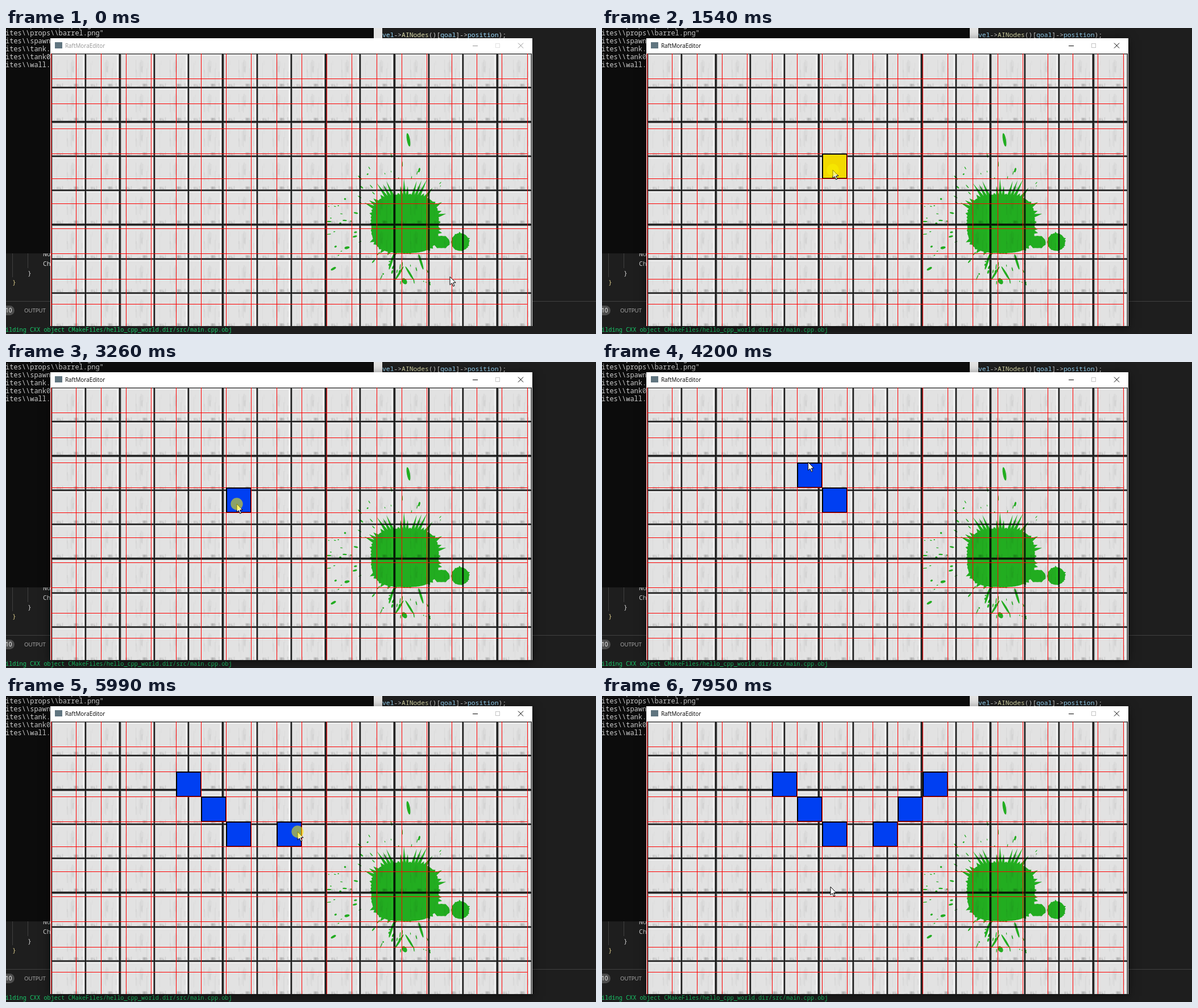
Write an HTML page with a canvas that moves like this. It is 1038 px wide and 539 px high and loops after 8000 ms.

```html
<!DOCTYPE html>
<html lang="en">
<head>
<meta charset="utf-8">
<title>Tile editor</title>
<style>
  html, body { margin: 0; width: 1038px; height: 539px; overflow: hidden; background: #1e1e1e; }
  canvas { display: block; }
</style>
</head>
<body>
<canvas id="stage" width="1038" height="539"></canvas>
<script>
const W = 1038, H = 539, LOOP = 8000, TILE = 60.35, CELL = 44.1;
const PRESS = 200, PAINT_DELAY = 40;
const BLUE = '#003ff2', YELLOW = '#f2d900';
const MONO = '"Noto Sans Mono", monospace', SANS = '"Open Sans", sans-serif';
const ctx = document.getElementById('stage').getContext('2d');

const gridX = col => Math.floor(79.15 + col * CELL);
const gridY = row => Math.floor(45.1 + row * CELL);

// Where the cursor rests; a painting stop ends with a click on the cell below it.
const stop = (arrive, leave, x, y, paints = false) => ({ arrive, leave, x, y, paints });
const stops = [
  stop(0, 30, 781, 438),
  stop(80, 3320, 406, 250, true),
  stop(3900, 4130, 368, 179, true),
  stop(4900, 5160, 310, 151, true),
  stop(5450, 5450, 543, 232),
  stop(5580, 6140, 513, 239, true),
  stop(6400, 6650, 545, 196, true),
  stop(6780, 6780, 571, 153),
  stop(6880, 7160, 577, 160, true),
  stop(7520, 7520, 377, 404),
  stop(7700, 7850, 414, 345),
  stop(7950, LOOP, 402, 336)
];
const strokes = stops.filter(s => s.paints);
// Trial clicks on the first cell, the third paints and the fourth clears
const trials = [[290, 720], [880, 1180], [1540, 1640], [1970, 2100], [2790, 2890]];
const presses = [...trials, ...strokes.map(s => [s.leave - PRESS, s.leave])];

function layer(w, h, draw) {
  const c = document.createElement('canvas');
  c.width = w;
  c.height = h;
  draw(c.getContext('2d'));
  return c;
}

function rect(g, color, x, y, w, h) {
  g.fillStyle = color;
  g.fillRect(x, y, w, h);
}

function text(g, str, x, y, size, family, color) {
  g.font = `${size}px ${family}`;
  g.fillStyle = color;
  g.fillText(str, x, y);
  return x + g.measureText(str).width;
}

function seeded(seed) {
  return () => (seed = seed * 16807 % 2147483647) / 2147483647;
}

const desktop = layer(W, H, g => {
  rect(g, '#1e1e1e', 0, 0, W, H);
  rect(g, '#414141', 0, 481, W, 1);
  rect(g, '#404040', 11, 397, 1, 42);
  rect(g, '#404040', 38, 397, 1, 26);
  ['No', 'Ch', '}', '}'].forEach((s, i) =>
    text(g, s, [65, 65, 38, 11][i], 402 + i * 16.8, 11.4, MONO, i < 3 ? '#d4d4d4' : '#d9c98a'));
  g.fillStyle = '#4d4d4d';
  g.beginPath();
  g.roundRect(-10, 489, 25, 17, 8.5);
  g.fill();
  text(g, '10', -1, 501, 10, SANS, '#fff');
  text(g, 'OUTPUT', 32, 501, 9.6, SANS, '#b5b5b5');
  text(g, 'ilding CXX object CMakeFiles/hello_cpp_world.dir/src/main.cpp.obj', -1, 535, 10.23, MONO, '#18cc6a');

  rect(g, '#0c0c0c', 0, 0, 647, 397);
  ['props\\\\prop', 'props\\\\barrel', 'spawn', 'tank', 'tank0', 'wall'].forEach((name, i) =>
    text(g, `ites\\\\${name}.png"`, -1, -1 + i * 14, 12, MONO, '#ccc'));
  rect(g, '#e4e4e4', 647, 0, 15, 19);
  let x = 662;
  for (const word of 'vel -> AINodes ()[ goal ]-> position );'.split(' ')) {
    const color = word === 'AINodes' ? '#dcdcaa' : /\w/.test(word) ? '#9cdcfe' : '#d4d4d4';
    x = text(g, word, x, 16, 11.37, MONO, color);
  }
});

const tile = layer(61, 61, g => {
  const rnd = seeded(77);
  rect(g, '#e2e2e2', 0, 0, 61, 61);
  for (let i = 0; i < 16; i++)
    rect(g, `rgba(120,120,120,${0.02 + rnd() * 0.07})`, 5 + rnd() * 48, 8 + rnd() * 24, 1 + rnd() * 2, 8 + rnd() * 22);
  for (let i = 0; i < 16; i++) {
    const h = 1 + rnd() * 5;
    rect(g, `rgba(100,100,100,${0.06 + rnd() * 0.16})`, 3 + rnd() * 52, 58 - h, 1 + rnd() * 4, h);
  }
  rect(g, '#eee', 2, 2, 55, 2);
  rect(g, '#f1f1f1', 55, 2, 3, 55);
  // Grooves, shared with the next tile
  for (const [at, color] of [[1, '#a8a8a8'], [58, '#909090'], [0, '#2c2c2c'], [60, '#2c2c2c'], [59, '#0e0e0e']]) {
    rect(g, color, at, 0, 1, 61);
    rect(g, color, 0, at, 61, 1);
  }
});

function drawSplat(g) {
  const rnd = seeded(29), cx = 702, cy = 345;
  const shape = new Path2D();
  // Rounded box with a ragged rim; reach(angle) sets how far the spikes go
  const blot = (x, y, rx, ry, power, count, reach) => {
    for (let i = 0; i < count; i++) {
      const a = i / count * 2 * Math.PI, c = Math.cos(a), s = Math.sin(a);
      const rim = (Math.abs(c / rx) ** power + Math.abs(s / ry) ** power) ** (-1 / power);
      const r = rim * 0.97 + (i % 2 ? reach(a) * rnd() ** 2 : 0);
      shape[i ? 'lineTo' : 'moveTo'](x + r * c, y + r * s);
    }
    shape.closePath();
  };
  const drop = (x, y, rx, ry, turn) => {
    shape.moveTo(x + rx * Math.cos(turn), y + rx * Math.sin(turn));
    shape.ellipse(x, y, rx, ry, turn, 0, 7);
  };
  const scatter = (count, from, to, near, far) => {
    for (let i = 0; i < count; i++) {
      const a = from + (to - from) * rnd(), r = near + (far - near) * rnd();
      drop(cx + r * Math.cos(a), cy + r * Math.sin(a), 1 + 4 * rnd(), 0.6 + 1.2 * rnd() ** 2, a);
    }
  };
  blot(cx, cy, 61, 53, 3, 130, a => 8 + 28 * Math.max(0, -Math.sin(a)));
  blot(799, 377, 16, 16, 2, 50, () => 3);
  blot(766, 377, 15, 11, 2, 20, () => 2);
  drop(708, 197, 12, 2.8, 1.4);
  drop(600, 387, 4.5, 2.2, -0.2);
  drop(576, 424, 5, 2, -0.5);
  drop(701, 446, 6, 4, 1);
  for (const side of [-1, 1]) {
    drop(701 + side * 9, 432, 14, 1.7, Math.PI / 2 - side * 0.55);
    drop(704 + side * 26, 412, 14, 2, Math.PI / 2 - side * 0.3);
  }
  scatter(22, 2.6, 3.8, 78, 140);
  scatter(24, 0.8, 2.3, 70, 115);
  scatter(16, 3.8, 5.6, 75, 125);
  g.globalCompositeOperation = 'multiply';
  g.fillStyle = '#26c324';
  g.fill(shape);
  g.globalCompositeOperation = 'source-over';
}

const field = layer(W, H, g => {
  g.beginPath();
  g.rect(79, 45, 846, 480);
  g.clip();
  for (let r = 0; r < 8; r++)
    for (let c = 0; c < 14; c++)
      g.drawImage(tile, Math.round(80 + c * TILE), Math.round(45 + r * TILE));
  drawSplat(g);
  for (let c = 0; c < 20; c++) rect(g, '#f00', gridX(c), 45, 1, 480);
  for (let r = 1; r < 11; r++) rect(g, '#f00', 79, gridY(r), 839, 1);
});

function drawWindow(active) {
  ctx.save();
  if (active) {
    ctx.shadowColor = 'rgba(0,0,0,.55)';
    ctx.shadowBlur = 16;
    ctx.shadowOffsetY = 3;
  }
  rect(ctx, '#fff', 78, 18, 848, 507);
  ctx.restore();
  const ink = active ? '#000' : '#949494';
  rect(ctx, '#607580', 86, 25, 13, 11);
  text(ctx, 'RaftMoraEditor', 104, 35, 9.9, SANS, ink);
  rect(ctx, ink, 821, 31, 9, 1);
  ctx.lineWidth = 1;
  ctx.strokeStyle = active ? '#c4c4c4' : '#e2e2e2';
  ctx.strokeRect(861.5, 27.5, 7, 7);
  ctx.strokeStyle = ink;
  ctx.stroke(new Path2D('M901 26.5l9 9m0-9l-9 9'));
  ctx.drawImage(field, 0, 0);
}

function paintCell({ x, y }, color) {
  const col = Math.floor((x - 79) / CELL), row = Math.floor((y - 45) / CELL);
  const left = gridX(col), top = gridY(row), w = gridX(col + 1) - left, h = gridY(row + 1) - top;
  rect(ctx, '#000', left, top, w, h);
  rect(ctx, color, left + 2, top + 2, w - 3, h - 3);
}

function cursorAt(t) {
  const i = stops.findLastIndex(s => s.arrive <= t);
  const from = stops[i], to = stops[i + 1] || from;
  const k = t <= from.leave ? 0 : (t - from.leave) / (to.arrive - from.leave);
  return [from.x + (to.x - from.x) * k, from.y + (to.y - from.y) * k];
}

const arrow = new Path2D('M0 0V14.5L3.3 11.5L5.8 17L8 16L5.6 10.8L10 10.5Z');

function drawCursor(x, y, pressed) {
  ctx.save();
  ctx.translate(x, y);
  ctx.fillStyle = '#fff';
  ctx.fill(arrow);
  ctx.strokeStyle = '#000';
  ctx.stroke(arrow);
  if (pressed) {
    ctx.fillStyle = 'rgba(250,240,0,.56)';
    ctx.beginPath();
    ctx.arc(0, 0, 10.7, 0, 7);
    ctx.fill();
  }
  ctx.restore();
}

function frame() {
  const t = performance.now() % LOOP;
  ctx.drawImage(desktop, 0, 0);
  drawWindow(t >= 320);
  if (t >= trials[2][0] && t < trials[3][0]) paintCell(strokes[0], YELLOW);
  for (const s of strokes)
    if (t >= s.leave - PRESS + PAINT_DELAY) paintCell(s, BLUE);
  drawCursor(...cursorAt(t), presses.some(([down, up]) => t >= down && t < up));
  requestAnimationFrame(frame);
}
frame();
</script>
</body>
</html>
```
